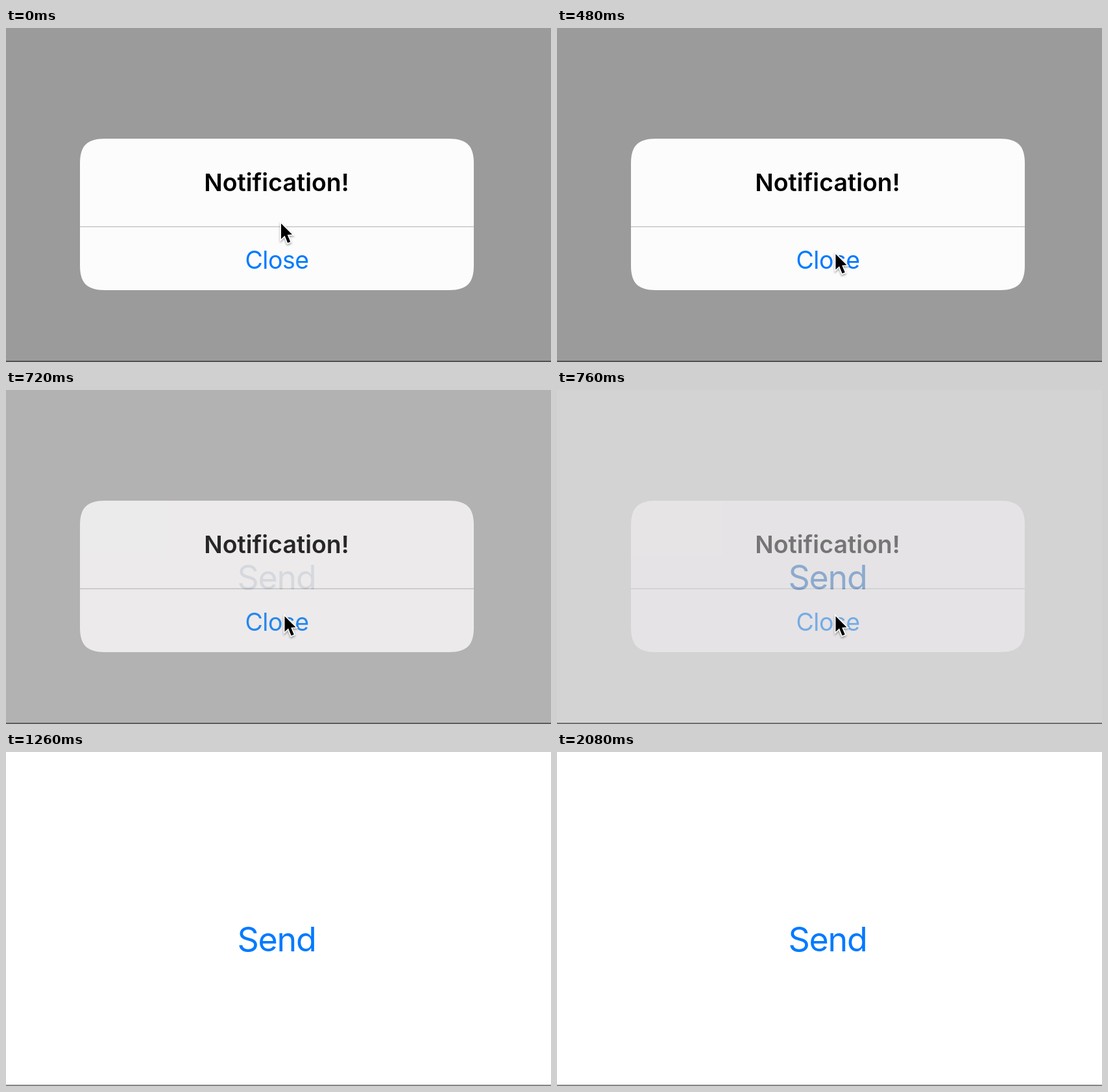
Write an HTML page that moves like this. It is 840x516 px and loops after 2.1 s.

```html
<!DOCTYPE html>
<html lang="en">
<head>
<meta charset="utf-8">
<title>Notification alert</title>
<style>
  html, body { margin: 0; width: 100%; height: 100%; overflow: hidden; background: #fff; }
  svg { display: block; }
  text { font: 37.5px Inter, "Liberation Sans", sans-serif; text-anchor: middle; }
  #send { font-size: 52px; letter-spacing: -1.3px; }
  .title { font-weight: 600; }
  .close { fill: #007aff; letter-spacing: -.5px; }
  #cursor { filter: drop-shadow(0 2px 1.5px rgba(0, 0, 0, .35)); }
</style>
</head>
<body>
<svg width="840" height="516" viewBox="0 0 840 516">
  <rect width="840" height="516" fill="#fff"/>
  <text id="send" x="417" y="308">Send</text>
  <rect y="514" width="840" height="2" fill="#86868a"/>
  <rect id="dim" width="840" height="516"/>
  <g id="alert">
    <path id="card" d="M152 171H683c27 0 38 11 38 38V367c0 27-11 38-38 38H152c-27 0-38-11-38-38V209c0-27 11-38 38-38z"/>
    <rect x="114" y="306" width="607" height="2" fill="#d4d4d6"/>
    <text class="title" x="417" y="252">Notification!</text>
    <text class="close" x="417.5" y="372">Close</text>
  </g>
  <path id="cursor" d="M0 0v24l5.6-5.2 4.5 11.2 4.2-1.8-4.6-10.8 7.3-.4z"
        stroke="#fff" stroke-width="3.4" paint-order="stroke"/>
</svg>
<script>
const LOOP = 2100, DISMISS = 685, FLICK = 1060, GONE = 1170;
const el = id => document.getElementById(id);
const [send, dim, alertBox, card, cursor] = ["send", "dim", "alert", "card", "cursor"].map(el);
const clamp = v => Math.min(1, Math.max(0, v));
const mix = (a, b, p) => `rgb(${a.map((v, i) => v + (b[i] - v) * p)})`;

// Critically damped spring from 0 to 1
function spring(ms) {
  const x = Math.max(0, ms) * 0.0248;
  return 1 - Math.exp(-x) * (1 + x);
}

function cursorAt(t) {
  const s = clamp((t - 20) / 480);
  const drift = s * s * (3 - 2 * s);
  const flick = Math.max(0, (t - FLICK) / 100);
  return [
    424 + 5.5 * Math.sqrt(drift) + 40 * flick ** 2,
    302 + 47.5 * drift - 181 * flick ** 2.6
  ];
}

function draw() {
  const t = performance.now() % LOOP;
  const p = spring(t - DISMISS);
  dim.setAttribute("opacity", 0.392 * (1 - p));
  alertBox.setAttribute("opacity", 1 - p);
  card.setAttribute("fill", mix([252, 252, 252], [255, 247, 254], p));
  send.setAttribute("fill", mix([142, 142, 142], [0, 122, 255], p));
  cursor.setAttribute("transform", `translate(${cursorAt(t)})`);
  cursor.setAttribute("visibility", t < GONE ? "visible" : "hidden");
  requestAnimationFrame(draw);
}
draw();
</script>
</body>
</html>
```
